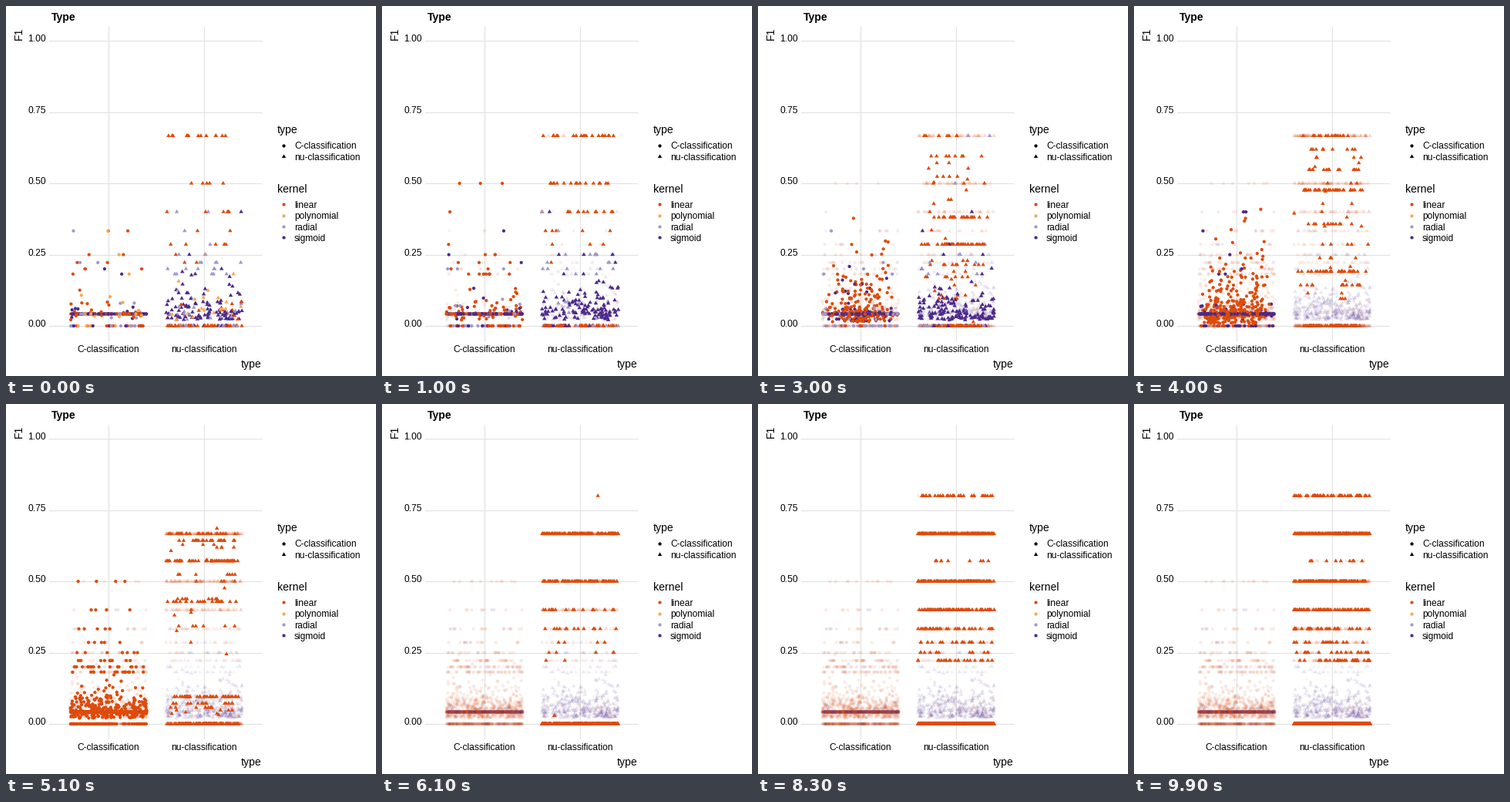
Recreate the animation shown at these times as a matplotlib script. Size 480 by 480 pixels, loop 10 s.

```python
import numpy as np
import matplotlib.pyplot as plt
from matplotlib.animation import FuncAnimation
from matplotlib.colors import to_rgb

SIZE, DPI = 480, 96
PT = 72 / DPI
FRAMES, INTERVAL = 100, 100
ROUNDS = 10
MOVE, CYCLE = 7, 12.25            # frames per transition, frames between starts
STARTS = [int(1.5 + CYCLE * k) for k in range(ROUNDS - 1)]
CENTER = {"C": 133, "nu": 257}
JITTER = 49.6
COLORS = {"linear": "#DE4B0A", "polynomial": "#FBA650",
          "radial": "#A099CC", "sigmoid": "#4D2A8B"}
GRID = "#E2E2E2"
FADE = 0.11
BASE = 0.042                      # F1 of a constant prediction

# rounds alive, first count, growth, share at zero, at BASE and on the ladder
GROUPS = {
    ("C", "linear"): (5, 95, 1.55, .15, .55, .10),
    ("C", "polynomial"): (1, 32, 1, .25, .35, .10),
    ("C", "radial"): (3, 32, 1.3, .30, .45, .08),
    ("C", "sigmoid"): (4, 70, 1.4, .08, .78, .03),
    ("nu", "linear"): (ROUNDS, 85, 1.4, .50, 0, .40),
    ("nu", "polynomial"): (1, 32, 1, .25, 0, .05),
    ("nu", "radial"): (3, 60, .7, .30, 0, .35),
    ("nu", "sigmoid"): (3, 110, 1.2, .06, 0, .04),
}

rng = np.random.default_rng(12)
plt.rcParams["font.family"] = "Liberation Sans"


def y_px(v):
    return 415 - 369.8 * np.asarray(v, float)


def ladder(shape, kernel, r, n):
    """Small-sample scores 2/k; linear nu models gather on the top steps."""
    if (shape, kernel) != ("nu", "linear"):
        return 2 / np.floor(3 + 9 * np.sqrt(rng.random(n)))
    k = 3 + np.floor(rng.exponential(1 + abs(r - 4) / 3, n))
    v = 2 / np.minimum(k, 9)
    best = max(0, round(n * .035 * (r - 4.9)))
    v[:best] = 4 / 5
    if r > 6:
        v[best:best + 9] = 4 / 7
    return v


def group(shape, kernel, r):
    """Columns x, y and drawing priority for one group in round r."""
    alive, first, growth, zero, base, steps = GROUPS[shape, kernel]
    if r >= alive:
        return np.empty((0, 3))
    n = int(min(first * growth ** r, 850))
    if r == ROUNDS - 1:
        n = 55
    base /= 1 + .3 * r * (kernel == "linear")
    if r:
        steps *= 1.25
    a, b, c = (round(n * share) for share in (zero, base, steps))
    rest = max(0, n - a - b - c)
    cloud = .02 + rng.gamma(1.4, .028, rest)
    v = np.concatenate([np.zeros(a), np.full(b, BASE),
                        ladder(shape, kernel, r, c), np.minimum(cloud, .3)])
    x = CENTER[shape] + rng.uniform(-JITTER, JITTER, len(v))
    pts = np.column_stack([x, y_px(v), rng.random(len(v))])
    # late on, mostly the low scores are the ones that move
    order = np.argsort(rng.random(len(v)) + .15 * v * (r > 6))
    return pts[order]


STATES = [{key: group(*key, r) for key in GROUPS} for r in range(ROUNDS)]


def pose(i):
    """Live points per group, and how many states already lie in the past."""
    if i < STARTS[0]:
        return STATES[0], 0
    k = max(n for n, s in enumerate(STARTS) if s <= i)
    t = (i - STARTS[k]) / MOVE
    if t >= 1:
        return STATES[k + 1], k + 1
    live = {}
    for key, a in STATES[k].items():
        b = STATES[k + 1][key]
        n = min(len(a), len(b))
        live[key] = a.copy()      # points without a partner wait in place
        live[key][:n, :2] += t * (b[:n, :2] - a[:n, :2])
    return live, k + 1


def merge(states, shape, alpha):
    """Offsets and colours of one shape, in a stable mixed drawing order."""
    pts, cols = [np.empty((0, 3))], [np.empty((0, 4))]
    for groups in states:
        for (s, kernel), p in groups.items():
            if s == shape:
                pts.append(p)
                cols.append(np.tile((*to_rgb(COLORS[kernel]), alpha), (len(p), 1)))
    pts, cols = np.vstack(pts), np.vstack(cols)
    order = np.argsort(pts[:, 2])
    return pts[order, :2], cols[order]


fig = plt.figure(figsize=(SIZE / DPI, SIZE / DPI), dpi=DPI, facecolor="white")
ax = fig.add_axes([0, 0, 1, 1])
ax.set(xlim=(0, SIZE), ylim=(SIZE, 0))
ax.axis("off")

TRIANGLE = [(-1, -.577), (1, -.577), (0, 1.155), (-1, -.577)]
MARK = {"C": dict(marker="o", s=(4.2 * PT) ** 2),
        "nu": dict(marker=TRIANGLE, s=(6.3 * PT) ** 2)}


def dots(x, y, shape, color, z):
    return ax.scatter(x, y, c=color, linewidths=0, zorder=z, **MARK[shape])


def label(x, y, s, px=12, ha="left", **kw):
    ax.text(x, y, s, fontsize=px * PT, ha=ha, va=kw.pop("va", "baseline"),
            color="black", **kw)


def line(x, y):
    ax.plot(x, y, color=GRID, lw=1.2 * PT, zorder=0)


# Grid and axis text
for v in (0, .25, .5, .75, 1):
    line([56, 331], [y_px(v)] * 2)
    label(52, y_px(v) + 1, f"{v:.2f}", ha="right")
for shape, x in CENTER.items():
    line([x, x], [27, 433.5])
    label(x, 449, shape + "-classification", ha="center")
label(59, 19, "Type", 14, weight="bold")
label(331, 469, "type", 14, ha="right")
label(16.5, 36, "F1", 14, ha="center", va="center", rotation=90)

# Legends
label(352, 165, "type", 14)
for n, shape in enumerate(CENTER):
    y = 180.8 + 14.4 * n
    dots([360], [y], shape, "black", 3)
    label(374, y + 4.4, shape + "-classification")
label(352, 242, "kernel", 14)
for n, (kernel, color) in enumerate(COLORS.items()):
    y = 257.2 + 14.4 * n
    dots([360], [y], "C", color, 3)
    label(374, y + 4.6, kernel)

ghosts = {s: dots([], [], s, None, 1) for s in CENTER}
points = {s: dots([], [], s, None, 2) for s in CENTER}


def draw(i):
    live, past = pose(i)
    for s in CENTER:
        for art, states, alpha in ((ghosts[s], STATES[:past], FADE),
                                   (points[s], [live], 1)):
            xy, cols = merge(states, s, alpha)
            art.set_offsets(xy)
            art.set_facecolors(cols)
    return [*ghosts.values(), *points.values()]


anim = FuncAnimation(fig, draw, frames=FRAMES, interval=INTERVAL,
                     repeat=True, repeat_delay=0, blit=False)
plt.show()
```
